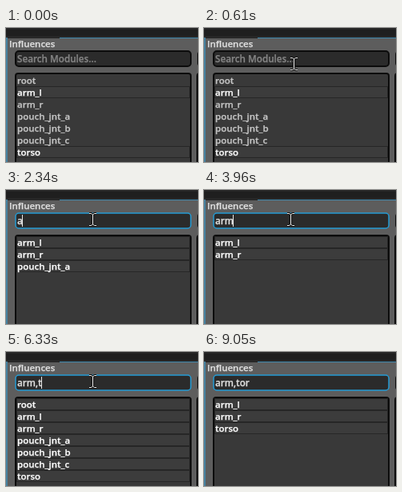
An HTML page for the animation above (9.42 s loop, 240 by 168 pixels).

```html
<!DOCTYPE html>
<html lang="en">
<head>
<meta charset="utf-8">
<title>Influence filter</title>
<style>
  html, body { margin: 0; width: 100%; height: 100%; overflow: hidden; background: #5d5d5d; }
  svg { display: block; width: 240px; height: 168px; }
  text {
    font: 600 11.5px "Open Sans", "Noto Sans", sans-serif;
    white-space: pre;
    fill: currentColor;
    stroke: currentColor;
    stroke-width: 0.25px;
  }
  #entry { font-size: 11.7px; }
  .well { fill: #2b2b2b; stroke: #0c0c0c; stroke-width: 2px; }
  .list { fill: #393939; stroke: #0c0c0c; stroke-width: 2px; }
</style>
</head>
<body>
<svg viewBox="0 0 240 168">
  <rect width="240" height="168" fill="#5d5d5d"/>
  <rect width="240" height="13" fill="#272727"/>
  <rect y="2" width="240" height="8" fill="#1f1f1f"/>
  <rect x="67" y="12" width="173" height="1" fill="#3f88ad"/>
  <rect y="12" width="2" height="156" fill="#45819f"/>
  <text x="4" y="24" color="#e0e0e0">Influences</text>

  <rect class="well" x="240" y="29" width="20" height="19" rx="4"/>
  <rect class="list" x="239" y="57" width="20" height="130" rx="3"/>

  <rect id="field" class="well" x="12" y="29" width="219" height="19" rx="4"/>
  <text id="entry" x="14" y="43"></text>
  <rect id="caret" y="31" width="1" height="15" fill="#e8e8e8"/>

  <rect class="list" x="12" y="57" width="219" height="130" rx="3"/>
  <g id="rows"></g>

  <g id="arrow" stroke-linejoin="round">
    <path d="M0.5 0.5V17.5L4.4 14L7.2 20.5L10 19.3L7.4 13H12.6Z" fill="#fff" stroke="#181818"/>
  </g>
  <g id="beam" fill="none">
    <path id="beamEdge" stroke="#151515" stroke-width="3"/>
    <path id="beamCore" stroke="#f2f2f2" stroke-width="1"/>
  </g>
</svg>
<script>
const LOOP = 9420;
const NAMES = ["root", "arm_l", "arm_r", "pouch_jnt_a", "pouch_jnt_b", "pouch_jnt_c", "torso"];
const ROW_TOP = 58, ROW_HEIGHT = 15;
const FOCUS_AT = 850;

// [start, typed text, caret x, caret shown]
const TYPING = [
  [0, "", 14, false], [FOCUS_AT, "", 14, true], [1340, "", 14, false],
  [2340, "a", 20, true], [2960, "arm", 36, true], [3460, "arm", 36, false],
  [3960, "arm", 36, true], [4830, "arm,", 39, true], [6330, "arm,t", 44, true],
  [7450, "arm,tor", 56, true], [8070, "arm,tor", 56, false],
  [8560, "arm,tor", 56, true], [9050, "arm,tor", 56, false]
];

// [start, cursor shape, x, y]
const POINTER = [
  [0, "none", 0, 0], [250, "arrow", 117, 102], [370, "arrow", 112, 72],
  [490, "arrow", 112, 53], [610, "beam", 112, 45], [730, "beam", 109, 39],
  [FOCUS_AT, "beam", 108, 37], [8680, "arrow", 135, 128], [8800, "none", 0, 0]
];

const byId = id => document.getElementById(id);
const at = (steps, time) => steps.findLast(step => step[0] <= time);

function setAttrs(node, attrs) {
  for (const key in attrs) node.setAttribute(key, attrs[key]);
  return node;
}

function addTo(parent, tag, attrs) {
  const node = document.createElementNS("http://www.w3.org/2000/svg", tag);
  return parent.appendChild(setAttrs(node, attrs));
}

const show = (node, visible) => setAttrs(node, { visibility: visible ? "visible" : "hidden" });

const BEAM = "M-4 -7.5H-1.5L0.5 -6L2.5 -7.5H5M0.5 -6V6M-4 7.5H-1.5L0.5 6L2.5 7.5H5";
setAttrs(byId("beamEdge"), { d: BEAM });
setAttrs(byId("beamCore"), { d: BEAM });

const rows = NAMES.map((_, i) => {
  const y = ROW_TOP + i * ROW_HEIGHT;
  const group = addTo(byId("rows"), "g", {});
  return {
    group,
    back: addTo(group, "rect", { x: 13.5, y: y + 0.5, width: 216, height: ROW_HEIGHT - 1 }),
    text: addTo(group, "text", { x: 14, y: y + 12 })
  };
});

// Comma-separated terms; a short trailing term of a list keeps all names.
function matches(query) {
  const terms = query.split(",");
  if (terms.length > 1 && terms.at(-1).length < 2) return NAMES;
  return NAMES.filter(name => terms.some(term => name.startsWith(term) || name.endsWith("_" + term)));
}

function drawRows(query, hovered) {
  const names = matches(query);
  rows.forEach(({ group, back, text }, i) => {
    const name = names[i];
    show(group, Boolean(name));
    if (!name) return;
    const selected = query !== "" || name === "arm_l" || name === "torso";
    text.textContent = name;
    setAttrs(text, { color: selected ? "#ffffff" : "#c6c6c6" });
    setAttrs(back, {
      fill: name === hovered ? "#4d4d4d" : selected ? "#3c3c3c" : "none",
      stroke: selected ? "#262626" : "none"
    });
  });
}

function drawPointer([, shape, x, y]) {
  for (const kind of ["arrow", "beam"]) {
    show(setAttrs(byId(kind), { transform: `translate(${x} ${y})` }), shape === kind);
  }
}

function render(time) {
  const [, query, caretX, caretOn] = at(TYPING, time);
  const overItem = time >= 370 && time < 490;

  byId("field").style.stroke = time >= FOCUS_AT ? "#249bd3" : "";
  byId("field").style.strokeWidth = time >= FOCUS_AT ? "1.5px" : "";
  const entry = setAttrs(byId("entry"), { color: query ? "#dedede" : "#858585" });
  entry.textContent = query || "Search Modules...";
  show(setAttrs(byId("caret"), { x: caretX }), caretOn);
  drawRows(query, overItem ? "arm_l" : null);
  drawPointer(at(POINTER, time));
}

const start = performance.now();
function tick() {
  render((performance.now() - start) % LOOP);
  requestAnimationFrame(tick);
}
tick();
</script>
</body>
</html>
```
